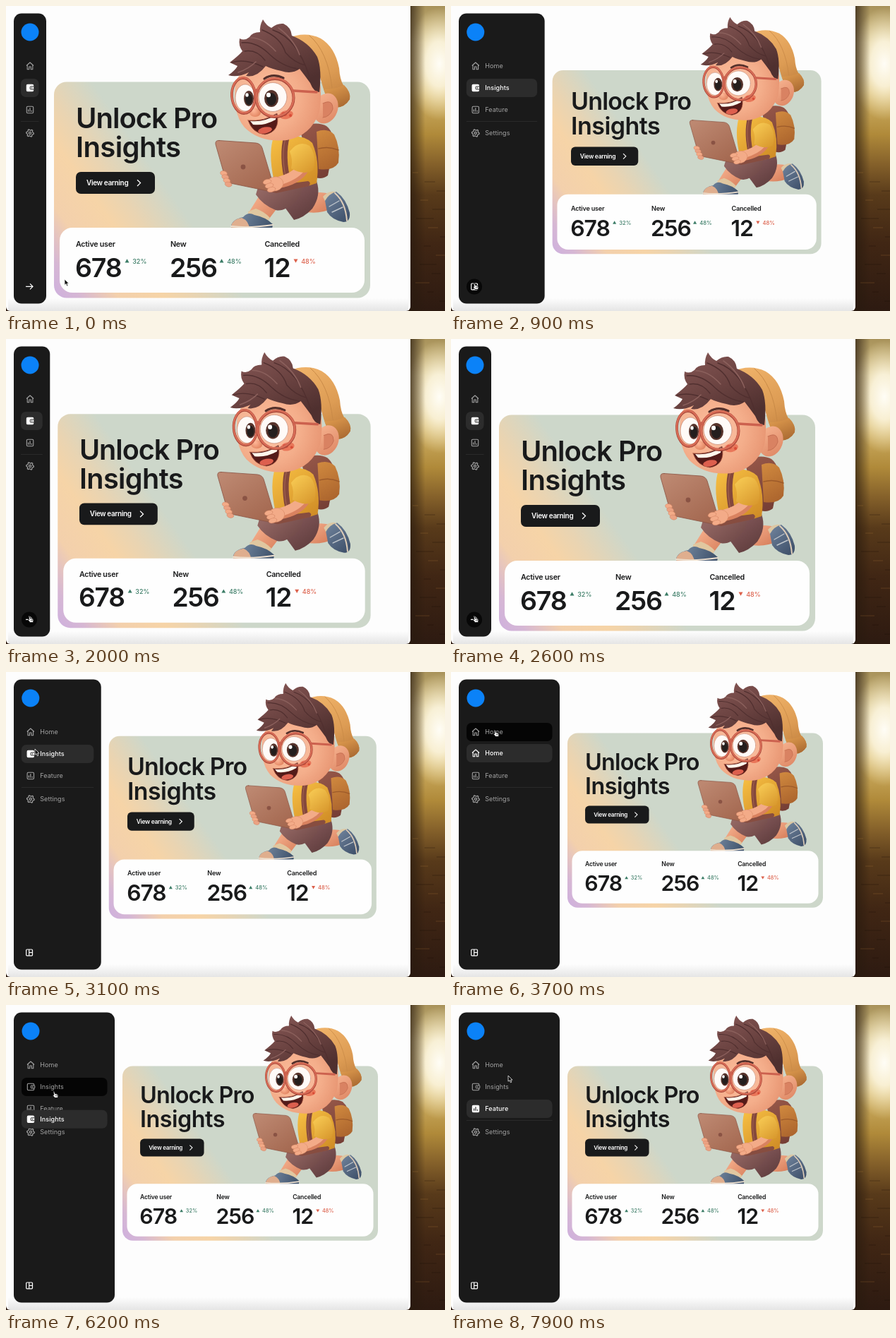
These frames come from a looping animation (622 px wide and 432 px high, 8 s). An HTML page with a canvas:

```html
<!DOCTYPE html>
<html lang="en">
<head>
<meta charset="utf-8">
<title>Insights dashboard</title>
<style>
  html, body { margin: 0; width: 622px; height: 432px; overflow: hidden; background: #fdfdfd; }
  canvas { display: block; width: 622px; height: 432px; }
</style>
</head>
<body>
<canvas id="stage"></canvas>
<script>
const W = 622, H = 432, LOOP = 8000;
const canvas = document.getElementById('stage');
const ratio = window.devicePixelRatio || 1;
canvas.width = W * ratio;
canvas.height = H * ratio;
const g = canvas.getContext('2d');

const FONT = 'Inter, "Open Sans", sans-serif';
const INK = '#191a1b', DIM = '#a3a3a3';
const ROWS = [85, 116, 147, 180];
const LABELS = ['Home', 'Insights', 'Feature', 'Settings'];
const TOGGLES = [[500, 1], [1500, 0], [2690, 1]];
const PICKS = [[3650, 0], [4100, 1], [4536, 2], [4950, 3], [5250, 0], [5650, 3], [6050, 1], [6560, 2]];
const POINTER = [
  [0, 83, 387], [80, 83, 387], [420, 33, 392], [2700, 33, 392], [3100, 41, 109],
  [3450, 62, 82], [3800, 62, 82], [4080, 64, 114], [4250, 65, 116], [4500, 66, 146],
  [4560, 66, 146], [4800, 60, 173], [4960, 60, 178], [5230, 64, 84], [5330, 64, 84],
  [5620, 62, 178], [5720, 62, 178], [6020, 67, 121], [6200, 68, 122], [6350, 68, 122],
  [6540, 70, 143], [7200, 71, 146], [7450, 71, 157], [7790, 72, 150], [7900, 81, 100], [8000, 81, 100]
];

const clamp = v => Math.max(0, Math.min(1, v));
const lerp = (a, b, p) => a + (b - a) * p;
const ease = u => u < .5 ? 2 * u * u : 1 - 2 * (1 - u) * (1 - u);

// Follows a list of [time, target] steps, each eased from the one before.
function follow(steps, start, span, t, map = v => v) {
  let from = start, to = start, p = 1;
  for (const [at, v] of steps) {
    if (t < at) break;
    from = to; to = v; p = ease(clamp((t - at) / span));
  }
  return { value: lerp(map(from), map(to), p), target: to };
}

function pointerAt(t) {
  let i = 0;
  while (i < POINTER.length - 2 && POINTER[i + 1][0] <= t) i++;
  const [a, x, y] = POINTER[i], [b, u, v] = POINTER[i + 1];
  const p = ease(clamp((t - a) / (b - a)));
  return [lerp(x, u, p), lerp(y, v, p)];
}

function paint(p, fill, stroke, width = 1) {
  if (fill) { g.fillStyle = fill; g.fill(p); }
  if (stroke) { g.strokeStyle = stroke; g.lineWidth = width; g.stroke(p); }
}
const shape = (d, fill, stroke, width) => paint(new Path2D(d), fill, stroke, width);

function box(x, y, w, h, r, fill, stroke, width) {
  const p = new Path2D();
  p.roundRect(x, y, w, h, r);
  paint(p, fill, stroke, width);
}

function oval(x, y, rx, ry, fill, stroke, width, turn = 0) {
  const p = new Path2D();
  p.ellipse(x, y, rx, ry, turn, 0, Math.PI * 2);
  paint(p, fill, stroke, width);
}

function text(s, x, y, size, weight, color, spacing = 0) {
  g.font = `${weight} ${size}px ${FONT}`;
  g.letterSpacing = spacing + 'px';
  g.fillStyle = color;
  g.fillText(s, x, y);
}

function blend(grad, colors) {
  colors.forEach((c, i) => Array.isArray(c)
    ? grad.addColorStop(c[0], c[1])
    : grad.addColorStop(i / (colors.length - 1), c));
  return grad;
}
const line = (x, y, u, v, ...c) => blend(g.createLinearGradient(x, y, u, v), c);
const glow = (x, y, r, ...c) => blend(g.createRadialGradient(x, y, 0, x, y, r), c);

function drawBackdrop() {
  g.fillStyle = line(0, 0, 0, H, '#a8925a', [.12, '#d0bd87'], [.28, '#d3b66c'], [.42, '#b08a3a'],
    [.52, '#84602a'], [.62, '#583a1a'], [.78, '#402614'], [1, '#2d1a11']);
  g.fillRect(0, 0, W, H);
  g.save();
  g.translate(614, 82);
  g.scale(.6, 1);
  g.fillStyle = glow(0, 0, 80, '#fffdf6', [.4, 'rgba(255,249,228,.85)'], [1, 'rgba(255,240,192,0)']);
  g.fillRect(-90, -90, 180, 180);
  g.restore();
  g.fillStyle = line(573, 0, 594, 0, 'rgba(40,26,14,.7)', 'rgba(40,26,14,0)');
  g.fillRect(570, 0, 52, H);
  for (let i = 0; i < 15; i++) {
    g.fillStyle = i % 3 ? 'rgba(20,10,5,.16)' : 'rgba(215,145,70,.1)';
    g.fillRect(576 + i * 17 % 40, 235 + i * 13, 8 + i * 7 % 18, 2);
  }
  box(0, -20, 573, 452, 6, '#fdfdfd');
  g.fillStyle = line(0, 414, 0, 432, 'rgba(110,110,110,0)', 'rgba(110,110,110,.17)');
  g.fillRect(3, 414, 567, 18);
}

const SKIN = '#f3ab88', SKIN_DARK = '#d9825f', BROWN = '#84483c';

function drawBody() {
  // backpack
  shape('M416 172Q440 162 454 170Q466 180 464 200L456 240Q446 248 432 240Z', line(420, 165, 462, 240, '#98594a', '#743d34'));
  shape('M440 178Q455 172 465 182Q474 200 471 222Q464 234 443 231Z', line(442, 176, 472, 230, '#d0893f', '#a9622c'));
  shape('M443 202Q457 198 471 204', null, '#9c5a2a', 1.5);
  // back leg
  shape('M422 270Q442 260 460 267L465 286Q442 296 422 291Z', line(430, 264, 450, 292, SKIN, SKIN_DARK));
  shape('M449 270Q457 261 466 263L474 276L458 289Z', '#dcc8a4');
  shape('M452 276Q457 266 468 263Q482 273 487 293Q488 306 478 306Q462 303 455 292Z', line(455, 268, 487, 302, '#6c7f98', '#3d4f69'));
  shape('M466 265Q481 278 483 304', null, '#dfcdb8', 2);
  shape('M458 284L472 276M462 292L477 285', null, '#c0c6cc', 1.4);
  // front leg
  shape('M358 270Q374 287 386 284L370 305Q352 307 343 294Z', line(350, 276, 378, 305, SKIN, SKIN_DARK));
  shape('M343 291L354 287Q366 291 374 300L366 310L344 306Z', '#e0c7a0');
  shape('M319 311Q321 302 336 299Q343 291 352 296Q368 299 378 309L377 316H320Z', line(325, 298, 370, 316, '#7488a0', '#43566f'));
  shape('M319 312Q321 302 334 300Q344 304 345 316H320Z', '#dfae8e');
  shape('M319 312Q345 315 378 310', null, '#eee0cf', 2);
  // shorts: back thigh, then front thigh
  shape('M392 256L440 248Q447 268 434 287Q422 300 408 303L392 281Z', line(400, 255, 432, 300, '#84585a', '#5f3d3d'));
  shape('M357 257L420 252Q420 276 398 286Q389 291 382 289Q364 282 354 267Z', line(370, 255, 400, 292, '#926662', '#714a49'));
  // shirt and strap
  shape('M378 189Q418 178 434 194Q445 220 440 251Q410 262 382 256Q371 216 378 189Z', line(385, 185, 438, 254, '#f5bd42', '#cf8b25'));
  shape('M398 184Q390 212 400 252', null, BROWN, 8.5);
  shape('M396 188Q389 213 398 250', null, '#a2624f', 1.2);
}

function drawLaptop() {
  shape('M374 255L428 248Q433 250 429 255L383 265L370 262Z', '#874d40');
  shape('M302 190.5L354 194Q361 195 363 201L379 254Q380 263 371 262L318 251Q312 250 311 245L297 196Q296 190 302 190.5Z',
    line(310, 190, 362, 264, '#bd8871', '#a3674f'), '#8a5242', .8);
  oval(336, 228, 3.4, 3.4, '#8a5344');
  for (let i = 0; i < 4; i++) oval(308.5 + i * 2.2, 237 + i * 5.2, 5, 3.4, i % 2 ? '#eba283' : SKIN, '#cf7e5e', .5, .25);
  // near arm
  g.lineCap = 'round';
  shape('M420 232Q410 246 386 250', null, SKIN_DARK, 16);
  shape('M418 230Q408 242 386 248', null, SKIN, 12);
  oval(381, 252, 12, 10, SKIN, '#d3845f', .5, -.25);
  for (let i = 0; i < 3; i++) oval(370 + i * 3, 249 + i * 5.5, 6, 3.5, SKIN, '#cf7e5e', .5, -.25);
  shape('M402 206Q415 189 430 198Q441 212 435 233Q421 240 404 230Q407 218 402 206Z', line(406, 195, 438, 234, '#f8cb54', '#d7962c'));
}

function drawCap() {
  shape('M398 46Q424 35 446 46Q466 58 472 88Q473 104 478 112Q489 122 487 132Q478 147 460 143Q448 118 441 84Q424 58 398 46Z',
    line(420, 42, 474, 142, '#eeb168', [.55, '#dd9c54'], '#bd7c3b'));
  shape('M450 118Q468 118 479 112Q489 122 487 132Q478 147 460 143Z', line(460, 116, 472, 145, '#d8954b', '#aa6a32'));
  shape('M430 42Q456 64 462 116', null, '#c98a47', 1);
}

function drawHead() {
  drawCap();
  // ear and face
  oval(453, 145, 17, 22, line(440, 126, 468, 168, '#f6b28f', '#dc8461'), null, 0, .35);
  shape('M449 138Q463 131 463 146Q459 157 449 158', '#d98262', '#c56f52', 1);
  shape('M326 105Q319 150 338 172Q360 194 398 190Q432 184 444 150Q452 100 430 78Q380 60 340 85Z',
    glow(370, 130, 92, '#fcbf9e', [.5, '#f4ae8b'], [.8, '#ea9a77'], '#db8462'));
  // eyes
  oval(339, 130, 14, 19, '#fffaf6', '#b3705c', .6);
  oval(378, 129, 20, 20.5, '#fffaf6', '#b3705c', .6);
  oval(344, 131, 7, 11, '#4a241b');
  oval(376, 131, 10, 12, '#4a241b');
  oval(344, 132, 5, 8, '#130d0c');
  oval(376, 132, 7, 9, '#130d0c');
  oval(341.5, 126, 2.2, 2.8, '#fff');
  oval(372, 126, 3, 3.3, '#fff');
  // nose, cheek and mouth
  oval(353, 151, 8, 6, glow(351, 148, 10, '#ffb898', '#e28561'));
  oval(397, 154, 10, 6, 'rgba(222,62,38,.5)', null, 0, -.2);
  oval(394, 153, 4, 3, '#d94c36');
  oval(403, 155, 2, 2, '#d94c36');
  shape('M343 162Q366 164 384 152Q389 178 367 182Q349 180 343 162Z', '#541b19', '#a5503c', .8);
  shape('M346 163Q366 165 383 154L382 161Q366 170 350 168Z', '#fff6eb');
  oval(367, 176, 10, 4.5, '#dd5f4e', null, 0, -.18);
  // hair
  shape('M315 98Q325 91 328 85L317 80Q330 70 335 64Q329 56 331 46Q338 50 345 44Q349 37 360 37Q359 28 364 19Q369 28 376 31Q384 24 393 25Q404 30 405 42Q429 51 441 72Q448 90 444 122Q436 122 431 109Q423 98 416 89Q405 97 390 92Q376 89 368 85Q355 102 340 99L344 94Q328 102 315 98Z',
    line(355, 25, 400, 118, '#7f5250', [.45, '#6b4341'], '#4f302f'));
  shape('M334 52Q355 50 374 69Q392 86 414 89M363 34Q389 44 396 66Q408 80 424 84M378 34Q412 45 430 100M320 80Q339 74 364 86M338 64Q355 61 367 77', null, '#502f2f', 1.4);
  shape('M347 45Q365 45 382 64M386 31Q407 46 416 69M329 94Q344 89 354 79', null, '#8b605c', 1.6);
  shape('M366 103Q378 95 393 102', null, '#54302b', 3.2);
  // glasses
  oval(336.5, 127, 16.5, 25, 'rgba(255,255,255,.07)', '#a9483a', 3.8, -.06);
  oval(336.5, 126.4, 16.5, 25, null, '#d96d57', 2.4, -.06);
  oval(381, 130, 26.5, 27, 'rgba(255,255,255,.07)', '#a9483a', 4);
  oval(381, 129.3, 26.5, 27, null, '#d96d57', 2.6);
  shape('M352 121Q355 117 357 121M407 120L440 122', null, '#cc614e', 3.6);
}

function trend(x, label, up, color) {
  const s = up ? -1 : 1;
  shape(`M${x - 3} ${361 - s * 2.4}H${x + 3}L${x} ${361 + s * 2.7}Z`, color);
  text(label, x + 7.7, 364.5, 9, 500, color);
}

function drawCard(p) {
  const k = lerp(1, .808, p);
  g.save();
  g.translate(lerp(68, 165, p), lerp(107.5, 86.5, p));
  g.scale(k, k);
  g.translate(-68, -107.5);

  box(68, 107.5, 448, 306, 18, line(68, 413, 248, 286, '#ceb0de', [.14, '#d6b7d4'],
    [.34, '#f3d0ac'], [.58, '#f6d4a7'], [.74, '#e9d4b2'], [1, '#cdd7ca']));
  text('Unlock Pro', 99, 173, 40, 600, INK, -1);
  text('Insights', 99, 214, 40, 600, INK, -.6);
  box(99, 235, 112, 31, 7, INK);
  text('View earning', 114, 254, 10, 600, '#fff', -.35);
  shape('M186 246.2L190.5 250.6L186 255', null, '#fff', 1.3);

  g.lineCap = g.lineJoin = 'round';
  drawBody();
  drawLaptop();
  drawHead();
  g.lineCap = 'butt';

  box(76, 314, 432, 92, 18, '#fefefe');
  [['Active user', '678', 99], ['New', '256', 233], ['Cancelled', '12', 366.5]].forEach(([name, n, x]) => {
    text(name, x, 341, 10.7, 600, INK, -.25);
    text(n, x - 1, 383.5, 37.5, 600, INK, -1.2);
  });
  trend(171.5, '32%', true, '#3b7c66');
  trend(305.5, '48%', true, '#3b7c66');
  trend(410.5, '48%', false, '#dc604b');
  g.restore();
}

function drawIcon(i, x, y, on) {
  const c = on ? '#fff' : DIM;
  g.save();
  g.translate(x, y);
  g.lineJoin = 'round';
  if (i === 0) {
    shape('M-5 -.5L0 -5L5 -.5M-3.8 -1V4.7H-1.3V1H1.3V4.7H3.8V-1', null, c, 1.1);
  } else if (i === 1) {
    box(-4.7, -4.7, 9.4, 9.4, 1.5, on ? c : null, c, 1.1);
    box(.2, -2, 5.6, 4, .8, on ? '#fff' : '#1a1a1a', on ? '#2c2c2c' : c, 1);
    oval(2.6, 0, .8, .8, on ? '#2c2c2c' : c);
  } else if (i === 2) {
    box(-4.7, -4.7, 9.4, 9.4, 1.5, on ? c : null, c, 1.1);
    shape('M-2.4 -.5V2.7M0 -2.7V2.7M2.4 1V2.7', null, on ? '#2c2c2c' : c, 1.2);
  } else {
    let d = '';
    for (let n = 0; n < 24; n++) {
      const a = n * Math.PI / 12, r = n % 4 < 2 ? 5.3 : 4;
      d += (n ? 'L' : 'M') + r * Math.cos(a) + ' ' + r * Math.sin(a);
    }
    shape(d + 'Z', null, c, 1.2);
    oval(0, 0, 1.6, 1.6, null, c, 1.2);
  }
  g.restore();
}

function drawRow(i, y, x, fade, on) {
  drawIcon(i, x, y, on);
  g.globalAlpha = fade;
  text(LABELS[i], 48.2, y + 3.2, 9, on ? 500 : 400, on ? '#fff' : DIM, .08);
  g.globalAlpha = 1;
}

function drawSidebar(p, pill, hover, overToggle) {
  const right = lerp(57, 154, p), left = 21 + p, width = right - 10.5 - left;
  const x = 34 + p, fade = clamp(p * 1.6 - .2);
  box(11, 10.5, right - 11, 411, 11, '#1a1a1a');
  oval(x, 37, 12.5, 12.5, '#0b82f8');

  g.save();
  g.beginPath();
  g.rect(11, 10, right - 15, 412);
  g.clip();
  g.fillStyle = '#2a2a2a';
  g.fillRect(left, 163, width, 1);
  if (hover >= 0) box(left, ROWS[hover] - 13, width, 26, 7, '#050505');
  ROWS.forEach((y, i) => drawRow(i, y, x, fade, false));
  box(left, pill.value - 13, width, 26, 7, '#2c2c2c');
  drawRow(pill.target, pill.value, x, fade, true);
  g.restore();

  if (overToggle) oval(33, 397.5, 11, 11, '#070707');
  if (p > .5) {
    box(28.7, 393, 8.8, 8.8, 1, null, '#fff', 1.2);
    shape('M32.7 393V401.8M32.7 397.4H37.5', null, '#fff', 1.2);
  } else {
    shape('M28 397.3H38M34 393.3L38 397.3L34 401.3', null, '#fff', 1.2);
  }
}

function drawPointer(x, y, hand) {
  g.save();
  g.translate(x, y);
  g.lineJoin = 'round';
  if (hand) {
    shape('M-1 .8Q-.8 -.4 .3 .2L1.8 4L2.9 3.3L4 4.4L5.2 4L6 6.8L5.4 9.5H1.2L-1.8 6.2Q-1.4 5 -.2 5.7Z', '#f6f6f6', '#111', .9);
    shape('M2.5 5.5L3 7.5M4.2 5.4L4.5 7.2', null, '#111', .7);
  } else {
    shape('M0 0V8.2L2 6.6L3.4 9.8L4.9 9.1L3.5 6.1H6Z', '#0c0c0c', '#efefef', .8);
  }
  g.restore();
}

function draw(t) {
  const p = follow(TOGGLES, 0, 600, t).value;
  const pill = follow(PICKS, 1, 400, t, i => ROWS[i]);
  const [x, y] = pointerAt(t);
  const overToggle = Math.hypot(x - 33, y - 397) < 11;
  const free = x > 22 && x < 143 && Math.abs(y - pill.value) > 13;
  const hover = free ? ROWS.findIndex(r => Math.abs(y - r) < 13) : -1;

  g.setTransform(ratio, 0, 0, ratio, 0, 0);
  drawBackdrop();
  drawCard(p);
  drawSidebar(p, pill, hover, overToggle);
  drawPointer(x, y, overToggle || hover >= 0);
}

function frame() {
  draw(performance.now() % LOOP);
  requestAnimationFrame(frame);
}
frame();
</script>
</body>
</html>
```
